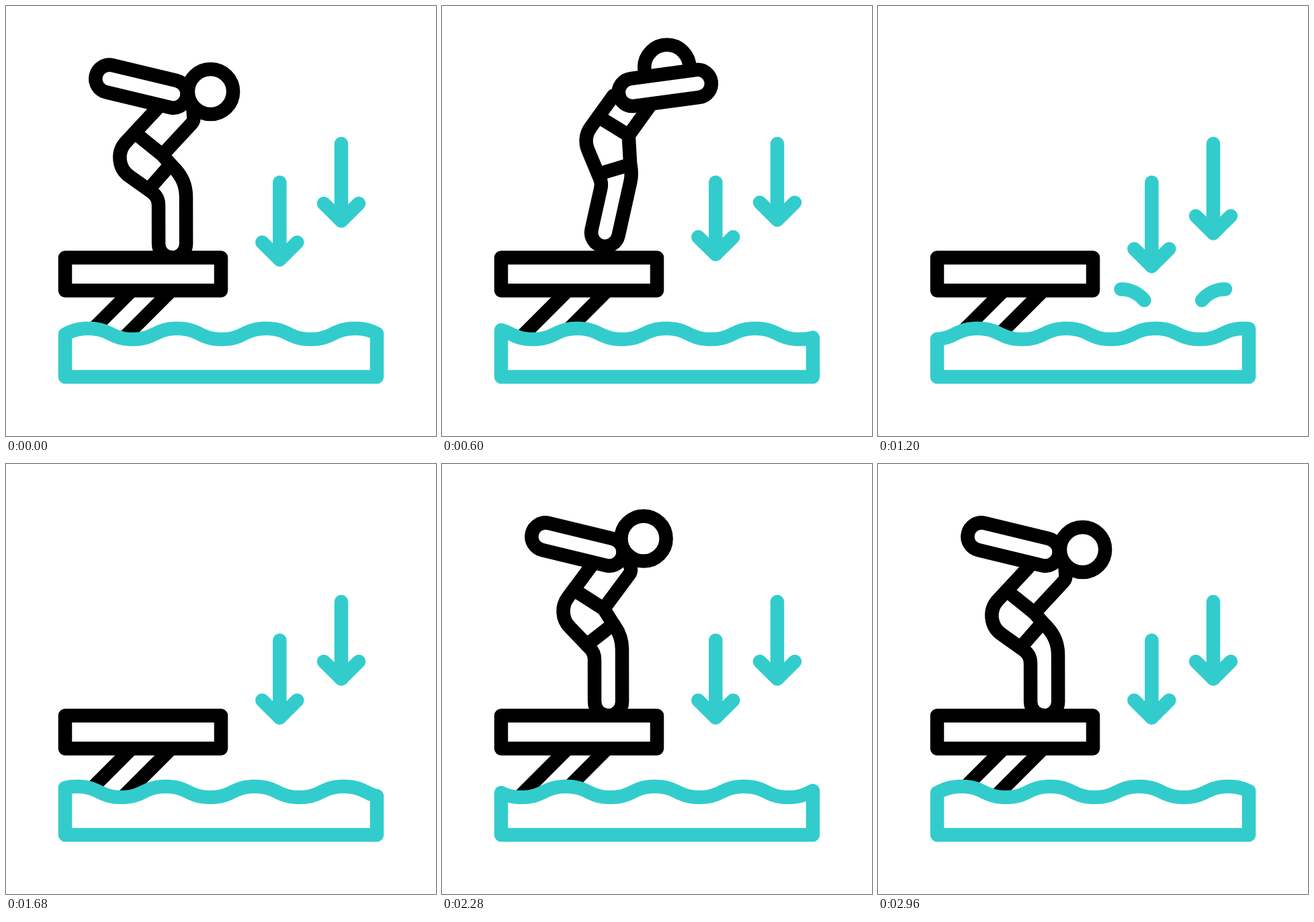
Recreate the animation shown at these times as an HTML page with a canvas. Size 640 px wide and 640 px high, loop 3000 ms.

```html
<!DOCTYPE html>
<html lang="en">
<head>
<meta charset="utf-8">
<title>Diver</title>
<style>
html, body { margin: 0; width: 100%; height: 100%; overflow: hidden; background: #fff; }
canvas { display: block; width: 100vmin; height: 100vmin; }
</style>
</head>
<body>
<canvas id="stage" width="640" height="640"></canvas>
<script>
const ctx = document.getElementById('stage').getContext('2d');
const LOOP = 3000, INK = '#000', TEAL = '#33cccc', LINE = 20.5;
const RAD = Math.PI / 180, QUARTER = Math.PI / 2;

// Joints of the back outline, plus foot, shoulder and head centres; arm in degrees.
const FOOT = [247.6, 354];
const CROUCH = { waist: [191.5, 188.5], hip: [152, 231], knee: [227, 284], foot: FOOT,
  shoulder: [249, 131], head: [304.5, 127.5], arm: 193.6 };
const SWING = { waist: [193, 186], hip: [161, 230], knee: [227, 284], foot: FOOT,
  shoulder: [238.5, 132], head: [299.5, 119], arm: 140 };
const LAND = { ...CROUCH, waist: [196, 187], hip: [170, 222], knee: [227, 281], head: [300, 111] };
const FLY = { waist: [372, 160], hip: [333, 162], knee: [298, 226], foot: [243.5, 275.5],
  shoulder: [432, 177], head: [493, 194], arm: 43.7 };

const clamp = v => Math.max(0, Math.min(1, v));
const part = (t, a, b) => clamp((t - a) / (b - a));
const ease = u => u * u * (3 - 2 * u);
const lerp = (a, b, u) => a + (b - a) * u;
const between = (p, q, u) => [lerp(p[0], q[0], u), lerp(p[1], q[1], u)];
const angle = (p, q) => Math.atan2(q[1] - p[1], q[0] - p[0]);
const polar = (p, a, r) => [p[0] + r * Math.cos(a), p[1] + r * Math.sin(a)];

function mapPose(pose, point, arm) {
  const out = { arm: arm(pose.arm) };
  for (const k in pose) if (k !== 'arm') out[k] = point(pose[k], k);
  return out;
}

const mix = (a, b, u) =>
  mapPose(a, (p, k) => between(p, b[k], u), v => lerp(v, b.arm, u));

function stroke(color) {
  ctx.strokeStyle = color;
  ctx.stroke();
}

function line(color, ...pts) {
  ctx.beginPath();
  for (const p of pts) ctx.lineTo(...p);
  stroke(color);
}

function fillStroke(color) {
  ctx.fillStyle = '#fff';
  ctx.fill();
  stroke(color);
}

// Direction from the foot circle to the point where a line from p touches it.
function touch(foot, p, side) {
  const d = Math.hypot(p[0] - foot[0], p[1] - foot[1]);
  return angle(foot, p) + side * Math.acos(Math.min(1, 20.5 / d));
}

function drawBody({ waist, hip, knee, foot, shoulder, head, arm }) {
  const torso = angle(hip, waist), thigh = angle(hip, knee);
  const neck = between(hip, waist, 2);
  const belly = polar(waist, torso + QUARTER - 4 * RAD, 53);
  const chest = polar(belly, torso, 69);
  const throat = between(chest, between(shoulder, head, 0.5), 0.4);
  const hem = between(hip, knee, 0.8);
  const lap = polar(hem, thigh - QUARTER + 6 * RAD, 50);
  const heel = touch(foot, knee, -1);
  const shin = polar(polar(knee, heel + QUARTER, 24), heel + Math.PI, 41);

  ctx.beginPath();
  ctx.moveTo(...neck);
  ctx.arcTo(...hip, ...knee, 34);
  ctx.arcTo(...knee, ...polar(foot, heel, 20.5), 24);
  ctx.arc(...foot, 20.5, heel, touch(foot, shin, 1), true);
  ctx.arcTo(...shin, ...lap, 60);
  ctx.lineTo(...lap);
  ctx.lineTo(...belly);
  ctx.arcTo(...chest, ...throat, 12);
  ctx.lineTo(...throat);
  fillStroke(INK);
  line(INK, waist, belly);
  line(INK, hem, lap);

  ctx.beginPath();
  ctx.arc(...head, 33.6, 0, 7);
  fillStroke(INK);

  const a = arm * RAD;
  ctx.beginPath();
  ctx.arc(...shoulder, 20.6, a + QUARTER, a - QUARTER);
  ctx.arc(...polar(shoulder, a, 97.8), 20.6, a - QUARTER, a + QUARTER);
  ctx.closePath();
  fillStroke(INK);
}

// The flying pose turns steadily while its middle follows a parabola.
function flight(t) {
  const turn = Math.min(85, 0.258 * (t - 800)), mid = [375, 215];
  const now = [Math.min(460, 375 + 0.49 * (t - 800)), 183 + 0.0022 * (t - 680) ** 2];
  const move = p =>
    polar(now, angle(mid, p) + turn * RAD, Math.hypot(p[0] - mid[0], p[1] - mid[1]));
  return mapPose(FLY, move, v => v + turn);
}

function poseAt(t) {
  if (t < 360) return mix(CROUCH, SWING, t / 360);
  if (t < 560) return mix(SWING, flight(560), part(t, 360, 560));
  if (t < 1200) return flight(t);
  return mix(LAND, CROUCH, ease(part(t, 2280, 2800)));
}

function drawDiver(t) {
  if (t >= 1200 && t < 1900) return;
  const away = t < 1200 ? 0 : Math.max(0, 2280 - t) / 40;
  ctx.save();
  ctx.beginPath();
  ctx.rect(0, 0, 640, 540);
  ctx.clip();
  ctx.translate(-50 * away, -44 * away);
  drawBody(poseAt(t));
  ctx.restore();
}

function drawBoard() {
  for (const x of [187, 246]) line(INK, [x, 423.5], [x - 76, 499.5]);
  ctx.beginPath();
  ctx.rect(88, 374.5, 232, 49);
  fillStroke(INK);
}

const WAVE = 132.4;

// Height of the swell at a distance from a crest; each half wave is an S curve.
function swell(d) {
  d = ((d % WAVE) + WAVE) % WAVE;
  const x = Math.min(d, WAVE - d) / (WAVE / 2);
  let lo = 0, hi = 1;
  for (let i = 0; i < 16; i++) {
    const s = (lo + hi) / 2;
    if (1.5 * s * (1 - s) + s ** 3 < x) lo = s; else hi = s;
  }
  return 480 + 16 * ease(lo);
}

function drawWater(t) {
  const crest = 122.5 - 0.0889 * t;
  ctx.beginPath();
  ctx.moveTo(88, 552);
  for (let x = 88; x <= 552; x += 2) ctx.lineTo(x, swell(x - crest));
  ctx.lineTo(552, 552);
  ctx.closePath();
  fillStroke(TEAL);
}

function drawSplash(t) {
  const front = part(t, 980, 1120) * QUARTER, tail = part(t, 1100, 1332) * QUARTER;
  if (front <= 0 || tail >= QUARTER) return;
  ctx.beginPath();
  ctx.arc(361.5, 466.5, 45, -tail, -front, true);
  stroke(TEAL);
  ctx.beginPath();
  ctx.arc(517, 466.5, 45, Math.PI + tail, Math.PI + front);
  stroke(TEAL);
}

function bob(t) {
  return -12 * ease(part(t, 160, 520)) + 31.5 * ease(part(t, 520, 880))
    - 19.5 * ease(part(t, 1080, 1320));
}

function drawArrow(x, top, tip) {
  line(TEAL, [x, top], [x, tip]);
  line(TEAL, [x - 26, tip - 25.7], [x, tip], [x + 26, tip - 25.7]);
}

function draw(t) {
  ctx.fillStyle = '#fff';
  ctx.fillRect(0, 0, 640, 640);
  ctx.lineWidth = LINE;
  ctx.lineCap = ctx.lineJoin = 'round';
  drawDiver(t);
  drawBoard();
  drawSplash(t);
  drawWater(t);
  drawArrow(407.3, 262.5, 377.5 + bob(t));
  drawArrow(499, 205, 319.7 + bob(t - 360));
}

const start = performance.now();
function tick() {
  draw((performance.now() - start) % LOOP);
  requestAnimationFrame(tick);
}
tick();
</script>
</body>
</html>
```
